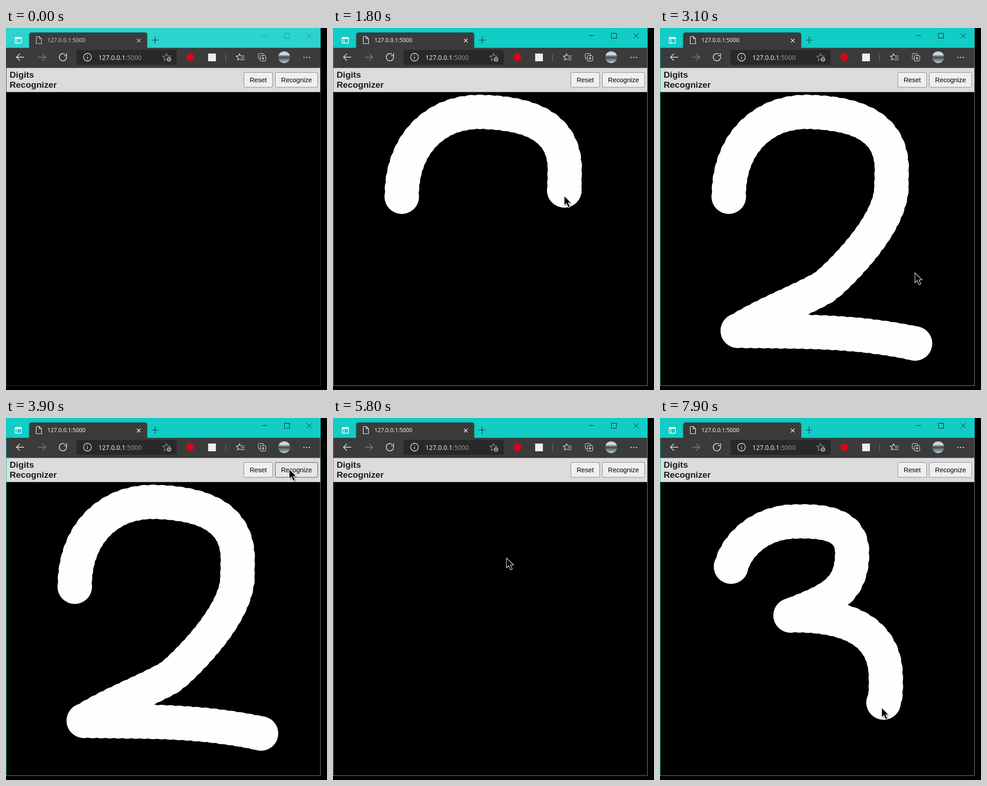
These frames come from a looping animation (705x794 px, 8000 ms). An HTML page with a canvas:

```html
<!DOCTYPE html>
<html lang="en">
<head>
<meta charset="utf-8">
<title>Digits Recognizer</title>
<style>
html, body { margin: 0; width: 100%; height: 100%; overflow: hidden; background: #000; }
canvas { display: block; }
svg { position: absolute; width: 0; height: 0; }
</style>
</head>
<body>
<canvas id="stage" width="705" height="794"></canvas>
<!-- Pen strokes, one path per leg, drawn at even speed -->
<svg>
  <g id="two">
    <path data-from="1000" data-to="1800" d="M151 370C150 260 220 184 322 184C430 186 509 215 509 310L508 356"/>
    <path data-from="1800" data-to="2350" d="M508 356C502 425 425 512 364 566C310 598 240 622 171 664"/>
    <path data-from="2350" data-to="2800" d="M171 664C300 667 420 662 560 692"/>
  </g>
  <g id="three">
    <path data-from="6400" data-to="6800" d="M156 326C168 280 215 235 280 228"/>
    <path data-from="6800" data-to="7310" d="M280 228C355 223 422 230 422 295C422 380 375 398 287 433"/>
    <path data-from="7310" data-to="7900" d="M287 433C400 431 496 460 496 570C496 590 497 610 491 624"/>
  </g>
</svg>
<script>
const ctx = document.getElementById('stage').getContext('2d');
const LOOP = 8000, STEP = 100, RADIUS = 38, SPACING = 19;
const FOCUS = 1000, HOVER = 3500, ANSWER = 4200, CLOSE = 5500;
const UI = '"Open Sans", "Noto Sans", sans-serif';
const ARIAL = '"Liberation Sans", Arial, sans-serif';
const WHITE = '#fefefc';

const legsOf = id => [...document.querySelectorAll(`#${id} path`)].map(path => ({
  path, len: path.getTotalLength(), from: +path.dataset.from, to: +path.dataset.to
}));
const two = legsOf('two'), three = legsOf('three');

// Cursor stops between strokes: [time, x, y]
const stops = [
  [300, 690, 300], [600, 330, 395], [1000, 151, 380],
  [2800, 560, 692], [3100, 560, 537], [HOVER, 622, 112], [4500, 622, 112],
  [4800, 207, 118], [5300, 530, 179], [CLOSE, 530, 179],
  [5800, 381, 307], [6150, 190, 374], [6400, 156, 336]
];

function rect(x, y, w, h, fill) { ctx.fillStyle = fill; ctx.fillRect(x, y, w, h); }

function box(x, y, w, h, r, fill, stroke, lw = 1) {
  ctx.beginPath();
  ctx.roundRect(x, y, w, h, r);
  if (fill) { ctx.fillStyle = fill; ctx.fill(); }
  if (stroke) { ctx.strokeStyle = stroke; ctx.lineWidth = lw; ctx.stroke(); }
}

function disc(x, y, r, fill) {
  ctx.beginPath();
  ctx.arc(x, y, r, 0, 7);
  ctx.fillStyle = fill;
  ctx.fill();
}

function line(d, color, lw = 1.3) {
  ctx.strokeStyle = color;
  ctx.lineWidth = lw;
  ctx.stroke(new Path2D(d));
}

function text(s, x, y, font, color, align = 'left') {
  ctx.font = font;
  ctx.fillStyle = color;
  ctx.textAlign = align;
  ctx.fillText(s, x, y);
}

function shadowed(color, blur, offset, paint) {
  ctx.save();
  ctx.shadowColor = color;
  ctx.shadowBlur = blur;
  ctx.shadowOffsetX = ctx.shadowOffsetY = offset;
  paint();
  ctx.restore();
}

function star(cx, cy, r, color) {
  ctx.beginPath();
  for (let i = 0; i < 10; i++) {
    const a = -Math.PI / 2 + i * Math.PI / 5, q = i % 2 ? r * 0.48 : r;
    ctx.lineTo(cx + q * Math.cos(a), cy + q * Math.sin(a));
  }
  ctx.closePath();
  ctx.strokeStyle = color;
  ctx.lineWidth = 1.2;
  ctx.stroke();
}

function titleBar(focused) {
  const controls = focused ? '#08211f' : '#1a928d';
  const ink = focused ? '#fff' : '#d2d2d2';
  rect(0, 0, 691, 44, focused ? '#11cdc5' : '#2dd3cd');
  shadowed('rgba(0,0,0,.4)', 3, 0, () => box(51, 10, 259, 40, 5, '#3b3b3b'));

  box(20, 20.5, 14, 13, 2.5, null, '#fff', 1.4);
  rect(20, 20, 14, 4, '#fff');
  rect(23.5, 23, 1.3, 10, '#fff');

  line('M67.5 18.5H73L78 23.5V34.5H66.5V19.5ZM73 18.5V23.5H78', ink, 1.2);
  text('127.0.0.1:5000', 91, 31, '12.3px ' + UI, ink);
  line('M287.5 23.5l8 8m0 -8l-8 8', ink, 1.2);
  line('M320 26.5h15m-7.5 -7.5v15', '#08302d', 1.2);
  line('M562 16.5h11M611.5 11.5h11v11h-11zM660.5 11.5l11 11m0 -11l-11 11', controls, 1);
}

function toolBar() {
  const ink = '#f4f4f4', dim = '#858585', bar = '#3b3b3b', field = '#292929';
  rect(0, 43.5, 691, 44, bar);
  line('M40 64H23m7.5 -7.5L23 64l7.5 7.5', ink, 1.4);
  line('M70 64H87m-7.5 -7.5L87 64l-7.5 7.5', dim, 1.4);
  line('M132.7 62A8 8 0 1 1 129.5 57.4M133 55.5v5h-5', ink, 1.4);

  box(155, 48, 220, 33, 4, field);
  line('M187.5 64a8.5 8.5 0 1 1 -17 0a8.5 8.5 0 1 1 17 0M179 63v5.5M179 59.5v1.5', ink);
  text('127.0.0.1', 203, 69.5, '14px ' + UI, '#fff');
  text(':5000', 203 + ctx.measureText('127.0.0.1').width, 69.5, '14px ' + UI, '#999');
  star(352.5, 64.5, 8.5, '#999');
  disc(358, 69, 6, field);
  disc(358, 69, 5, '#a0a0a0');
  line('M355 69h6m-3 -3v6', field, 1.1);

  disc(405, 64, 8.7, '#d5061b');
  rect(444, 56, 17, 17, '#f1ecee');
  rect(482, 56, 1, 17, '#777');

  star(513, 64, 7.5, ink);
  rect(514, 61, 12, 10, bar);
  line('M516 61.5h8m-8 4h8m-10 4h10', ink, 1.2);

  box(554, 56, 12, 12, 2.5, null, ink);
  box(558.5, 60.5, 12, 12, 2.5, bar, ink);
  line('M561 66.5h7m-3.5 -3.5v7', ink, 1.2);

  const photo = ctx.createLinearGradient(0, 51, 0, 77);
  ['#a9bac5', '#dbe2e5', '#3b4a50', '#7d8d94', '#c4ccd0']
    .forEach((c, i) => photo.addColorStop(i / 4, c));
  disc(611, 64, 13, photo);
  for (let i = 0; i < 3; i++) disc(654.5 + 6 * i, 64.5, 1.3, ink);
}

function button(label, x, w, hover) {
  box(x + 0.5, 97.5, w, 32.5, 2.5, hover ? '#e6e6e6' : '#efefef', hover ? '#505050' : '#83838c');
  text(label, x + w / 2 + 0.5, 119, '14.4px ' + ARIAL, '#000', 'center');
}

function page(hover) {
  rect(0, 87.5, 691, 53, '#dcdcdc');
  text('Digits', 8, 109, 'bold 19.2px ' + ARIAL, '#1c1c1c');
  text('Recognizer', 8, 131, 'bold 19.2px ' + ARIAL, '#1c1c1c');
  button('Reset', 522, 63, false);
  button('Recognize', 591, 93, hover);
}

function border(focused) {
  const edge = focused ? '#14b5ae' : '#343434';
  rect(0, 44, 1, 741, edge);
  rect(0, 784, 691, 1, edge);
  rect(690, 44, 1, 741, focused ? '#7d8f8e' : '#3a3a3a');
}

function dialog() {
  shadowed('rgba(0,0,0,.45)', 8, 1, () => box(106, 82, 481, 134, 4, '#4a4a4a'));
  text('127.0.0.1:5000 says', 123, 114, 'bold 14.5px ' + UI, '#fff');
  text('2', 122.5, 144, '13.5px ' + UI, '#fff');
  box(501, 165, 69, 34, 2, '#0b70c0');
  text('OK', 535, 186.5, 'bold 12.5px ' + UI, '#fff', 'center');
}

// Length of a leg drawn by time t
const drawn = (leg, t) => leg.len * Math.min(1, (t - leg.from) / (leg.to - leg.from));

// The brush stamps round dots along each leg, and one at the pen tip.
function brush(legs, t) {
  for (const leg of legs) {
    if (t < leg.from) return;
    const end = drawn(leg, t);
    for (let s = 0; s < end + SPACING; s += SPACING) {
      const p = leg.path.getPointAtLength(Math.min(s, end));
      disc(p.x, p.y, RADIUS, WHITE);
    }
  }
}

// While drawing, the cursor runs a little ahead of the brush.
function cursorAt(t) {
  const leg = [...two, ...three].find(l => t >= l.from && t <= l.to);
  if (leg) {
    const s = drawn(leg, t), at = d => leg.path.getPointAtLength(s + d);
    const p = at(0), a = at(-4), b = at(4), n = Math.hypot(b.x - a.x, b.y - a.y);
    return [p.x + 12 * (b.x - a.x) / n, p.y + 12 * (b.y - a.y) / n];
  }
  const i = stops.findIndex(stop => stop[0] >= t);
  if (i < 1) return null;
  const [t0, x0, y0] = stops[i - 1], [t1, x1, y1] = stops[i], f = (t - t0) / (t1 - t0);
  return [x0 + (x1 - x0) * f, y0 + (y1 - y0) * f];
}

function cursor([x, y]) {
  const arrow = new Path2D('M0 0V21.5L5 17L9 26L12.7 24.4L9 15.5H15.5Z');
  ctx.save();
  ctx.translate(x, y);
  shadowed('rgba(0,0,0,.5)', 3, 2, () => { ctx.fillStyle = '#000'; ctx.fill(arrow); });
  ctx.strokeStyle = '#fff';
  ctx.lineWidth = 1.1;
  ctx.stroke(arrow);
  ctx.restore();
}

function draw(t) {
  const focused = t >= FOCUS;
  rect(0, 0, 705, 794, '#000');
  titleBar(focused);
  toolBar();
  page(t >= HOVER && t < CLOSE);
  border(focused);
  if (t < ANSWER) brush(two, t);
  else if (t < CLOSE) dialog();
  else brush(three, t);
  const tip = cursorAt(t);
  if (tip) cursor(tip);
}

const begin = performance.now();
function tick() {
  const t = (performance.now() - begin) % LOOP;
  draw(Math.floor(t / STEP) * STEP);
  requestAnimationFrame(tick);
}
tick();
</script>
</body>
</html>
```
